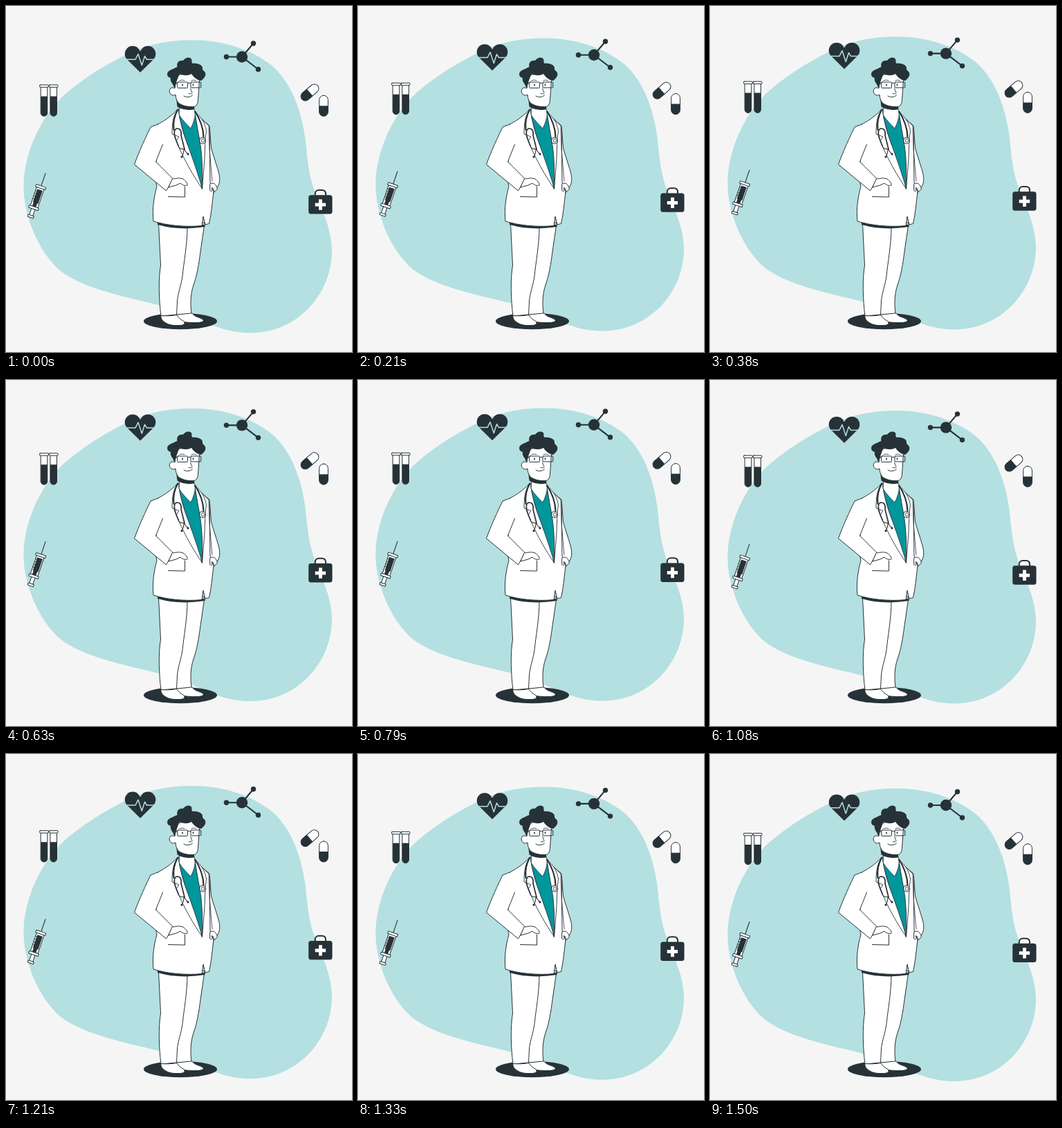
An HTML page with a canvas for the animation above (1540 ms loop, 500 px wide and 500 px high).

```html
<!DOCTYPE html>
<html lang="en">
<head>
<meta charset="utf-8">
<title>Doctor</title>
<style>
html, body { margin: 0; width: 100%; height: 100%; overflow: hidden; background: #f5f5f5; }
canvas { display: block; width: 100vw; height: 100vh; }
</style>
</head>
<body>
<canvas id="stage" width="500" height="500"></canvas>
<script>
const ctx = document.getElementById('stage').getContext('2d');
const DARK = '#263238', WHITE = '#fff', PALE = '#b4e0e1', TEAL = '#00979c';
const LOOP = 1540, STEPS = 37, FLOAT_HEIGHT = 10, REST = 0.5;

ctx.lineCap = ctx.lineJoin = 'round';

function shape(path, fill, stroke, width = 1) {
  const p = typeof path === 'string' ? new Path2D(path) : path;
  if (fill) { ctx.fillStyle = fill; ctx.fill(p); }
  if (stroke) { ctx.strokeStyle = stroke; ctx.lineWidth = width; ctx.stroke(p); }
}
const line = (path, width = 1, color = DARK) => shape(path, null, color, width);

function ellipse(x, y, rx, ry, fill, stroke, width) {
  const p = new Path2D();
  p.ellipse(x, y, rx, ry, 0, 0, 2 * Math.PI);
  shape(p, fill, stroke, width);
}
const dot = (x, y, r, fill = DARK, stroke, width) => ellipse(x, y, r, r, fill, stroke, width);

function box(x, y, w, h, radius, fill, stroke, width) {
  const p = new Path2D();
  p.roundRect(x, y, w, h, radius);
  shape(p, fill, stroke, width);
}

function at(x, y, angle, draw) {
  ctx.save();
  ctx.translate(x, y);
  ctx.rotate(angle);
  draw();
  ctx.restore();
}

function blob() {
  shape(`M268 49.2 C312 49 354 62 384 86 C414 112 428 155 433 196 C436 229 439 249 447 270
    C458 298 471 324 471 355 C470 418 420 472.5 353 472.5 C331 472.5 313 467 296 460.5
    C267 449 249 438.5 222 432.5 C172 420 113 409 79 383 C46 355 25 301 25.5 260
    C26 213 49 164 80 132.5 C112 103 152 80 183 66 C210 54 238 49.2 268 49.2Z`, PALE);
}

function heart() {
  dot(183, 69.2, 11.3);
  dot(205, 69.2, 11.3);
  shape('M175 77.2 L194 96 L213 77.2 L205 66 L194 65 L183 66Z', DARK);
  line('M174 77.3 H187 L191 69.5 L196.3 85.5 L200.5 72.5 L203.5 77.3 H214', 1.5, PALE);
}

function molecule() {
  line('M318.5 73.5 H341 L357.5 54 M341 73.5 L364.5 91.5', 2.1);
  dot(341, 73.5, 8.2);
  for (const [x, y] of [[318.5, 73.5], [357.5, 54], [364.5, 91.5]]) dot(x, y, 3.7);
}

function tube(x) {
  box(x - 4.8, 116, 9.6, 43.3, [0, 0, 4.8, 4.8], WHITE, DARK);
  box(x - 4.8, 130.5, 9.6, 28.8, [0, 0, 4.8, 4.8], DARK);
  box(x - 6.3, 114, 12.6, 3.4, .6, WHITE, DARK);
}

function pill(x, y, angle) {
  at(x, y, angle, () => {
    box(-6.4, -15, 12.8, 30, 6.4, WHITE, DARK);
    box(-6.4, 0, 12.8, 15, [0, 0, 6.4, 6.4], DARK);
  });
}

function kit() {
  line('M446.7 274 V271.5 C446.7 268 449 266 452 266 H456.5 C460 266 462 268 462 271.5 V274', 2);
  box(437.2, 273.2, 34.3, 27.4, 3.5, DARK);
  box(446.7, 284.7, 15.4, 4.9, 0, WHITE);
  box(452, 279.4, 4.9, 15.4, 0, WHITE);
}

function syringe() {
  at(57, 242, .33, () => {
    line('M0 0 V19', 1.1);
    box(-2.7, 53, 5.4, 12, 0, WHITE, DARK);
    box(-5.6, 22, 11.2, 29, 0, WHITE, DARK);
    box(-3.8, 25, 8, 20, 0, DARK);
    box(-2.8, 44, 5.6, 7, 0, DARK);
    line('M-5.3 28 h3 m-3 4 h2 m-2 4 h3 m-3 4 h2', .8);
    box(-7.4, 19, 14.8, 3.6, .7, WHITE, DARK);
    box(-7.2, 50.7, 14.4, 3.6, .7, WHITE, DARK);
    box(-4.4, 64, 8.8, 3.2, .7, WHITE, DARK);
  });
}

function legs() {
  ellipse(252, 455.5, 53, 11.7, DARK);
  shape(`M246 446 L268 443 C272 449 279 450 283 452 C288 455 284 457 277 457.5
    C267 458 255 457 247 454Z`, WHITE, DARK);
  shape(`M220.5 314 L223.5 375 C220 395 221 425 224 448 L246.5 446 L268 444
    C266 428 267 415 271 403 C276 390 279 371 281 355 L287 314Z`, WHITE, DARK);
  line('M262 319 C262 345 257 370 255 390 C253 404 249 413 247.5 426 L246.5 447');
  shape(`M224 447.5 C223 453 228 457 235 460 C241 462 247 461.5 252 461.5
    C258 461 260 458 256 455 C252 453 249 450 246.5 446.5 C239 448 231 448 224 447.5Z`, WHITE, DARK);
}

function coat() {
  line('M220.5 314.5 C240 320 263 321 286 317.5', 3.6);
  // right sleeve
  shape(`M274 156 L293.5 172.5 C295.5 181 295 194 297 207 L307 239 C309.5 248 309.5 255 306 261
    L300 270 L290 262Z`, WHITE, DARK);
  // torso
  shape(`M247.5 150 C237 161 227 167 219 171 L216 250 L218 261 C214 275 211 293 213 311
    C231 317 260 320 283 317.5 L285 304 L288 316 L293.5 314.5 C297 299 298 285 300 268
    L295 255 L294 174 L274 155Z`, WHITE, DARK);
  // shirt and neck
  shape('M249 153 L257 184 L283.5 265 L284 230 L283 207 L273.5 152Z', TEAL, DARK, .7);
  shape('M251 140 L250 157 C255 165 261 171 267 177 C271 169 273 162 273.5 155 L271 144Z', WHITE, DARK, .8);
  // lapels
  shape(`M249 149 C242 158 240 167 240 185 L250 189 L246 195 C257 222 271 246 283.5 264
    C279 247 271 224 263 202 C256 184 251 166 249 149Z`, WHITE, DARK, .9);
  shape(`M273 153 C281 159 288 169 289.5 181 L288 192 L287 220 L283.5 264
    C284.5 232 283 207 278 184Z`, WHITE, DARK, .9);
  line('M293 174 L294 207 L298 253', .8);
  // right hand
  shape('M295 257 C300 254 304 258 305.5 264 L301 269 C300 265 299 262 297 263 C299 267 298 269 295 267Z', WHITE, DARK);
  // left sleeve
  shape('M219 171 L209 175 C203 187 192 211 185.5 229 L231.5 267 L241.5 250 L216.5 225 L226.5 200', WHITE, DARK);
  shape('M240.5 250 C247 249 251 248 256 250 C260 253 263 257 262 259 C258 260 255 259 252 256 L246 259 L235 262Z', WHITE, DARK);
  line('M258.5 261 V276 L234.5 275.5');
}

function stethoscope() {
  line('M248 150 C243 159 241 168 242.5 179', 2.2);
  line('M245 192 C242 184 243 178 247 177 C252 177 254 181 253 187 M245 192 L249 202 M253 187 L258 207', 1.7);
  line('M249 202 C250 208 256 206 258 207 M257 208 C257 212 256 215 254 218 M258 208 C260 211 261 212 263 214', 1.1);
  dot(254, 218, 1.6);
  dot(263, 214, 1.6);
  line('M273.5 153 C280 163 285 177 285.5 189', 2.2);
  dot(284, 194.5, 4.5, WHITE, DARK, 1.2);
  dot(284.5, 194.5, 2.4, WHITE, DARK, .8);
}

function head() {
  shape('M246 133 L247.5 145.5 C254 150 264 151 272 149.5 L272 143Z', DARK);
  shape(`M246 101 L244 119 C239 116 235 120 236.5 125 C238 129 242 130 245 128
    C245 133 247 137 249 140 C256 145 265 146 272 145.5 C276 144 277 141 277.5 136
    L279.5 107 L271 95Z`, WHITE, DARK);
  shape(`M244.5 118 C245 113 247 111 246.5 109 C248 105 249 102 251 98 C257 101 263 101 268 98
    C271 103 276 107 282 108 C286 105 289.5 101 288 96.5 C287 94 284 93 284 91
    C285 86 278 82 269.5 83 C267 80 270 78 267 75.5 C262 73 258 76 256 79
    C250 78 246 82 247.5 88 C243 90 239 92 236 93.5 C231.5 96 232 103 238 104
    C237 107 239 111 241 113 C242 116 243 118 244.5 118Z`, DARK);
  box(247.5, 110, 15, 8.5, 1, null, DARK, 1);
  box(267, 110, 14.8, 8, 1, null, DARK, 1);
  line('M262.5 112 Q265 110 267 112 M247.5 112 L244 111');
  line('M250.5 108 Q254 106 258 107.5 M268 107.5 Q272 106 275 108', .8);
  ellipse(255, 114, .9, 1.6, DARK);
  ellipse(270.5, 113.8, .9, 1.6, DARK);
  line('M266.5 119 L269 125.5 Q268 128 264 126.5', .9);
  line('M257 130 C260 132.5 266 132 269.5 129', 1);
}

function render(now) {
  // the picture moves in even steps, one triangle wave per loop
  const step = Math.floor((now % LOOP + 5) / LOOP * STEPS);
  const phase = (step + 1) / STEPS % 1;
  const lift = FLOAT_HEIGHT * (1 - Math.abs(1 - 2 * phase));

  ctx.fillStyle = '#f5f5f5';
  ctx.fillRect(0, 0, 500, 500);
  at(0, REST - lift, 0, () => {
    blob();
    heart();
    molecule();
    tube(55);
    tube(68.7);
    pill(439, 125, .86);
    pill(459, 144.3, 0);
    kit();
    syringe();
  });
  legs();
  coat();
  stethoscope();
  head();
}

const start = performance.now();
function tick() {
  render(performance.now() - start);
  requestAnimationFrame(tick);
}
tick();
</script>
</body>
</html>
```
